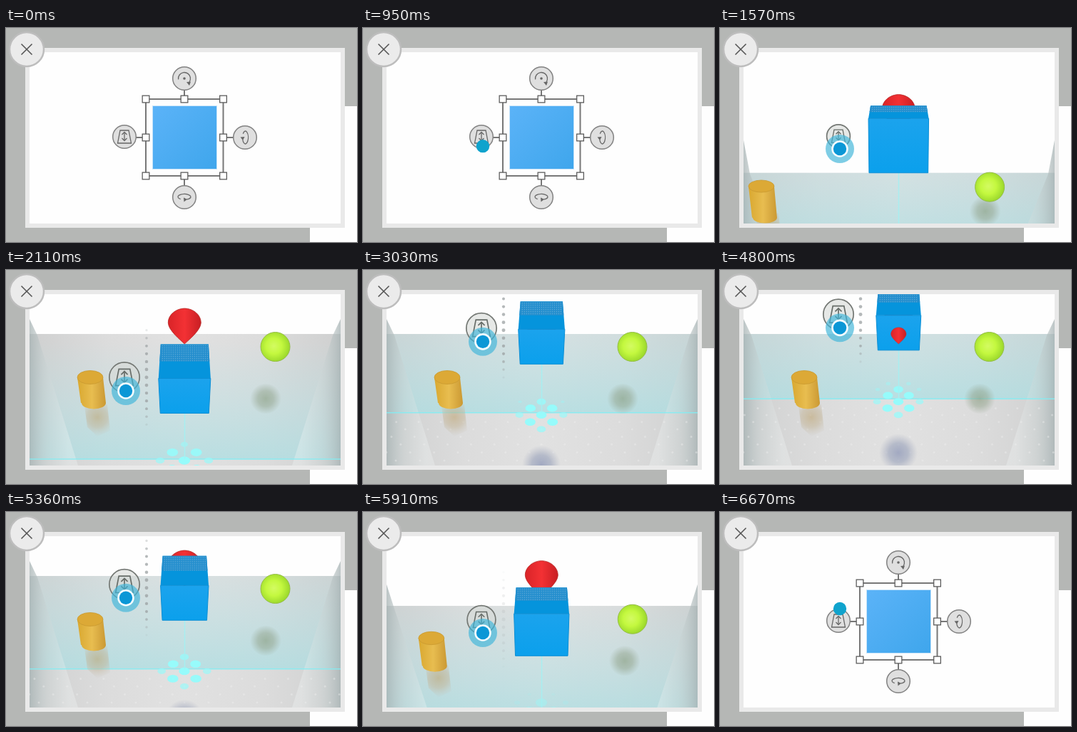
An HTML page with a canvas for the animation above (6900 ms loop, 492x301 px).

```html
<!DOCTYPE html>
<html lang="en">
<head>
<meta charset="utf-8">
<title>Depth handle</title>
<style>
html, body { margin: 0; width: 100%; height: 100%; overflow: hidden; background: #b5b7b5; }
canvas { display: block; width: 492px; height: 301px; }
</style>
</head>
<body>
<canvas id="stage" width="492" height="301"></canvas>
<script>
const ctx = document.getElementById('stage').getContext('2d');
const LOOP = 6900, STEP = 77.5, LAST = 86, TAU = Math.PI * 2;
const VIEW = { l: 33, t: 34, r: 469, b: 275 };

// Height of the dragged pointer over time
const DRAG = [[2100, 169], [2600, 140], [3030, 100], [3500, 79], [3960, 72],
  [4500, 73], [5000, 93], [5360, 120], [5700, 157], [5900, 169]];

const clamp = (v, a = 0, b = 1) => Math.min(b, Math.max(a, v));
const lerp = (a, b, p) => a + (b - a) * p;
const ramp = (t, a, b) => clamp((t - a) / (b - a));
const smooth = (t, a, b) => { const p = ramp(t, a, b); return p * p * (3 - 2 * p); };

function curve(points, t) {
  const last = points.length - 1;
  if (t <= points[0][0]) return points[0][1];
  if (t >= points[last][0]) return points[last][1];
  const i = points.findIndex((q, n) => n < last && t < points[n + 1][0]);
  const slope = n => {
    if (n === 0 || n === last) return 0;
    const a = points[n - 1], b = points[n + 1];
    return (b[1] - a[1]) / (b[0] - a[0]);
  };
  const [t0, v0] = points[i], [t1, v1] = points[i + 1], d = t1 - t0, p = (t - t0) / d;
  const h = p * p * (3 - 2 * p);
  return v0 + (v1 - v0) * h + d * p * (1 - p) * ((1 - p) * slope(i) - p * slope(i + 1));
}

function paint(fill, stroke, width = 1) {
  if (fill) { ctx.fillStyle = fill; ctx.fill(); }
  if (stroke) { ctx.strokeStyle = stroke; ctx.lineWidth = width; ctx.stroke(); }
}

function oval(x, y, rx, ry, fill, stroke, width) {
  ctx.beginPath();
  ctx.ellipse(x, y, rx, ry, 0, 0, TAU);
  paint(fill, stroke, width);
}
const disc = (x, y, r, fill, stroke, width) => oval(x, y, r, r, fill, stroke, width);

function poly(points, fill, stroke, width, open) {
  ctx.beginPath();
  points.forEach(([x, y]) => ctx.lineTo(x, y));
  if (!open) ctx.closePath();
  paint(fill, stroke, width);
}
const line = (points, color, width) => poly(points, null, color, width, true);

function box(x, y, w, h, fill) {
  ctx.fillStyle = fill;
  ctx.fillRect(x, y, w, h);
}

function gradient(x0, y0, x1, y1, ...colors) {
  const g = ctx.createLinearGradient(x0, y0, x1, y1);
  colors.forEach((c, i) => g.addColorStop(i / (colors.length - 1), c));
  return g;
}

function glow(x, y, r, ...colors) {
  const g = ctx.createRadialGradient(x, y, 0, x, y, r);
  colors.forEach((c, i) => g.addColorStop(i / (colors.length - 1), c));
  return g;
}

function withAlpha(a, draw) {
  if (a <= 0) return;
  ctx.save();
  ctx.globalAlpha *= a;
  draw();
  ctx.restore();
}

function at(x, y, scale, draw) {
  ctx.save();
  ctx.translate(x, y);
  ctx.scale(scale, scale);
  draw();
  ctx.restore();
}

function page() {
  box(0, 0, 492, 301, '#b5b7b5');
  box(475, 110, 17, 191, '#fefefe');
  box(426, 281, 66, 20, '#fefefe');
  box(27, 28, 448, 253, '#e9e9e9');
  box(VIEW.l, VIEW.t, 436, 241, '#fefefe');
}

function closeButton() {
  disc(29, 30, 24, '#ebebeb', '#bdbdbd', 2.5);
  line([[21.5, 22.5], [36.5, 37.5]], '#555', 1.6);
  line([[36.5, 22.5], [21.5, 37.5]], '#555', 1.6);
}

function depthIcon(color) {
  poly([[-6, -9], [6, -9], [9.5, 9], [-9.5, 9]], null, color, 1.3);
  line([[0, -6], [0, 5]], color, 1.3);
  line([[-3.5, -3], [0, -6.5], [3.5, -3]], color, 1.3);
  line([[-3.5, 2], [0, 5.5], [3.5, 2]], color, 1.3);
}

function spinIcon(color) {
  ctx.beginPath();
  ctx.arc(0, 0, 8.5, Math.PI * 0.95, TAU + 0.6);
  paint(null, color, 1.3);
  disc(0, 0, 1.8, color);
  poly([[3, 5], [9, 4.5], [7, 10]], color);
}

function turnIcon(color) {
  ctx.beginPath();
  ctx.ellipse(0, -0.5, 9, 4, 0, 2.2, TAU + 1.2);
  paint(null, color, 1.3);
  poly([[-1, 0.5], [4, 3], [-0.5, 6.5]], color);
}

function knob(x, y, icon, angle = 0) {
  disc(x, y, 16.3, '#dfdfdf', '#828282', 1.5);
  at(x, y, 1, () => { ctx.rotate(angle); icon('#666'); });
}

function selection() {
  const gray = '#777';
  box(205, 109, 91, 90, '#c8e4fa');
  box(206, 110, 89, 88, gradient(206, 110, 295, 198, '#5bb3f8', '#3fa6ec'));
  ctx.strokeStyle = gray;
  ctx.lineWidth = 2;
  ctx.strokeRect(196, 100, 108.5, 108);
  line([[250, 86], [250, 100]], gray, 2);
  line([[250, 208], [250, 223]], gray, 2);
  line([[182, 154], [196, 154]], gray, 2);
  line([[304, 154], [319, 154]], gray, 2);
  for (const x of [196, 250, 304.5]) for (const y of [100, 154, 208]) {
    if (x === 250 && y === 154) continue;
    box(x - 5.5, y - 5.5, 11, 11, '#5c5c5c');
    box(x - 4.2, y - 4.2, 8.4, 8.4, '#fff');
  }
  knob(250, 71, spinIcon);
  knob(250, 238, turnIcon);
  knob(335, 154, turnIcon, Math.PI / 2);
  knob(166, 153, depthIcon);
}

const latticeY = k => 268 - 11.7 * k + 0.17 * k * k;

function eachNode(draw) {
  for (let k = -2; k < 15; k++) {
    const y = latticeY(k), dx = 17 - 0.025 * (268 - y);
    for (let n = -15; n <= 15; n++) {
      if ((n + k) % 2 === 0) draw(250 + n * dx, y, dx, n, k);
    }
  }
}

function floor(p, edge) {
  const top = lerp(268, 90, p);
  box(VIEW.l, top, 436, VIEW.b - top, gradient(VIEW.l, 0, VIEW.r, 0, '#cfd0d0', '#dcdcdc', '#e1e1e1', '#dcdcdc', '#cfd0d0'));
  box(VIEW.l, top, 436, Math.min(edge, VIEW.b) - top,
    gradient(0, edge - 165, 0, edge, 'rgba(180,224,228,0)', 'rgba(180,224,228,.4)', 'rgba(172,222,226,.75)'));
  for (const side of [-1, 1]) {
    const x = d => 251 + side * (218 - d);
    const high = top - lerp(60, 21, p);
    poly([[x(0), high], [x(lerp(8, 11, p)), top + 2], [x(lerp(20, 68, p)), VIEW.b], [x(0), VIEW.b]],
      gradient(x(0), 0, x(55), 0, 'rgba(165,177,178,.75)', 'rgba(205,214,214,.35)', 'rgba(240,244,244,.35)'));
  }
  withAlpha(ramp(p, 0.6, 1), () => {
    eachNode((x, y) => { if (y > edge + 5) disc(x, y, 1.5, 'rgba(240,240,240,.4)'); });
    line([[VIEW.l, edge], [VIEW.r, edge]], 'rgba(130,238,244,.85)', 1.5);
    eachNode((x, y, dx, n) => {
      const d = Math.hypot(n / 2.7, (y - edge - 3) / 29);
      if (d < 1) {
        const r = dx * 0.48 * Math.min(1, 1.3 * (1 - d * d * 0.75));
        withAlpha(clamp(1.7 - d * 1.4), () => oval(x, y, r, r * 0.7, '#96fbfb'));
      }
    });
  });
}

function sphere(p) {
  const x = lerp(378.5, 377.5, p), y = lerp(289, 108, p);
  const sx = lerp(376, 364, p), sy = lerp(301, 181, p);
  oval(sx, sy, 22, 21, glow(sx, sy, 22, 'rgba(135,155,125,.62)', 'rgba(145,162,138,.5)', 'rgba(150,165,145,0)'));
  disc(x, y, 20.5, glow(x - 2, y - 1, 22, '#d3fb62', '#c4f83f', '#9cd92c'), '#94bd45', 1);
}

function cylinder(p) {
  const x = lerp(24, 118, p), y = lerp(263, 151, p), h = lerp(49, 36, p);
  const rx = 18, ry = lerp(8, 9.5, p), lean = 5;
  poly([[x - 8, y + 40], [x + 24, y + 38], [x + 28, y + 75], [x + 10, y + 83], [x - 4, y + 70]],
    glow(x + 10, y + 56, 28, 'rgba(190,165,115,.6)', 'rgba(195,180,150,.5)', 'rgba(200,195,185,0)'));
  ctx.beginPath();
  ctx.moveTo(x - rx, y);
  ctx.lineTo(x - rx + lean, y + h);
  ctx.ellipse(x + lean, y + h, rx - 1, ry - 1, 0, Math.PI, 0, true);
  ctx.lineTo(x + rx, y);
  ctx.closePath();
  paint(gradient(x - 18, 0, x + 23, 0, '#d9a830', '#e8bd50', '#c99732'));
  oval(x, y, rx, ry, '#dca936', '#c99a30', 0.8);
}

function drop(x, tip, scale) {
  if (scale <= 0) return;
  at(x, tip, scale, () => {
    ctx.beginPath();
    ctx.moveTo(0, 0);
    ctx.bezierCurveTo(-5, -5, -23, -19, -23, -30);
    ctx.bezierCurveTo(-23, -41, -12, -50, 0, -50);
    ctx.bezierCurveTo(12, -50, 23, -41, 23, -30);
    ctx.bezierCurveTo(23, -19, 5, -5, 0, 0);
    paint(gradient(-23, 0, 23, 0, '#d92428', '#f33134', '#c81f24'), '#b52a28', 0.8);
  });
}

function cube(p, u) {
  const half = lerp(45.5, 26.9 + 0.057 * u, p);
  const base = lerp(205, u + 32.5, p), front = lerp(92, 49, p);
  const depth = lerp(1, 39 + (u - 100) * 0.132, p);
  const edge = base - front, back = edge - depth, mid = edge - depth * 0.5;
  const inset = Math.min(3, depth / 6), foot = 2.5 * p, cx = 250.3;
  poly([[cx - half + inset, back], [cx + half - inset, back], [cx + half, edge], [cx - half, edge]], '#0594dc');
  poly([[cx - half + inset, back], [cx + half - inset, back], [cx + half - inset / 2, mid], [cx - half + inset / 2, mid]], '#258fce');
  ctx.fillStyle = 'rgba(125,185,222,.6)';
  for (let y = back + 1.5; y < mid - 1; y += 3) {
    for (let x = cx - half + inset + 2; x < cx + half - inset - 1; x += 3) ctx.fillRect(x, y, 1.3, 1.3);
  }
  poly([[cx - half, edge], [cx + half, edge], [cx + half - foot, base], [cx - half + foot, base]],
    gradient(0, edge, 0, base, '#1ba3ed', '#0ba0ec'), '#0c8ed4', 1);
}

function scene(p, u) {
  const edge = u + 101 - Math.max(0, u - 130) * 0.1 + (1 - p) * 60;
  floor(p, edge);
  const shade = 250 + (u - 72) * 0.85 + (1 - p) * 60;
  oval(250, shade, 27, 28, glow(250, shade, 27, 'rgba(135,145,180,.7)', 'rgba(145,155,182,.55)', 'rgba(160,165,185,0)'));
  sphere(p);
  cylinder(p);
  line([[250.5, lerp(205, u + 33, p)], [250.5, Math.min(edge, VIEW.b)]], 'rgba(165,240,242,.9)', 1.5);
  withAlpha(ramp(p, 0.7, 1), () => {
    for (let y = 40.5; y < VIEW.b; y += 11.05) {
      const near = 1 - Math.abs(y - u + 18) / 76;
      if (near > 0) disc(197, y, 1.5 + near, `rgba(155,160,162,${Math.min(0.75, near * 1.7)})`);
    }
  });
  drop(250.3, lerp(166, 104, p), 1);
  cube(p, u);
  drop(250.3, 104, ramp(u, 90, 73) * 0.82 * p);
}

function depthHandle(p, u) {
  const scale = lerp(1, 1.3, smooth(p, 0.3, 1)), y = lerp(153, u - 18, p);
  disc(166, y, 16.3 * scale, 'rgba(215,218,215,.6)', '#747874', 1.7);
  at(166, y, scale, () => depthIcon('#666c68'));
}

function pointer(y, halo) {
  if (halo > 0) {
    disc(168, y, 20 * halo, 'rgba(65,182,218,.67)');
    disc(168, y, 9 + 2.8 * halo, '#f4fcff');
  }
  disc(168, y, 9.2, halo > 0.5 ? '#0b97d6' : '#0fa3cd');
}

function draw(t) {
  const p = smooth(t, 1300, 1940) * (1 - smooth(t, 5720, 6290));
  const shown = ramp(t, 1220, 1400) * (1 - ramp(t, 6170, 6320));
  const halo = ramp(t, 1220, 1390) * (1 - ramp(t, 6200, 6320));
  const u = curve(DRAG, t);

  page();
  ctx.save();
  ctx.beginPath();
  ctx.rect(VIEW.l, VIEW.t, 436, 241);
  ctx.clip();
  withAlpha(1 - shown, selection);
  withAlpha(shown, () => {
    scene(p, u);
    depthHandle(p, u);
  });
  if (t >= 310) {
    const enter = lerp(25, 170, smooth(t, 290, 1010));
    const leave = 34 * ramp(t, 6290, 6670) ** 2;
    pointer(t < 1100 ? enter : u + 1 - leave, halo);
  }
  ctx.restore();
  closeButton();
}

function tick() {
  const k = Math.min(LAST, Math.floor((performance.now() % LOOP) / STEP));
  draw(k * STEP + (k ? 10 : 0));
  requestAnimationFrame(tick);
}
tick();
</script>
</body>
</html>
```
